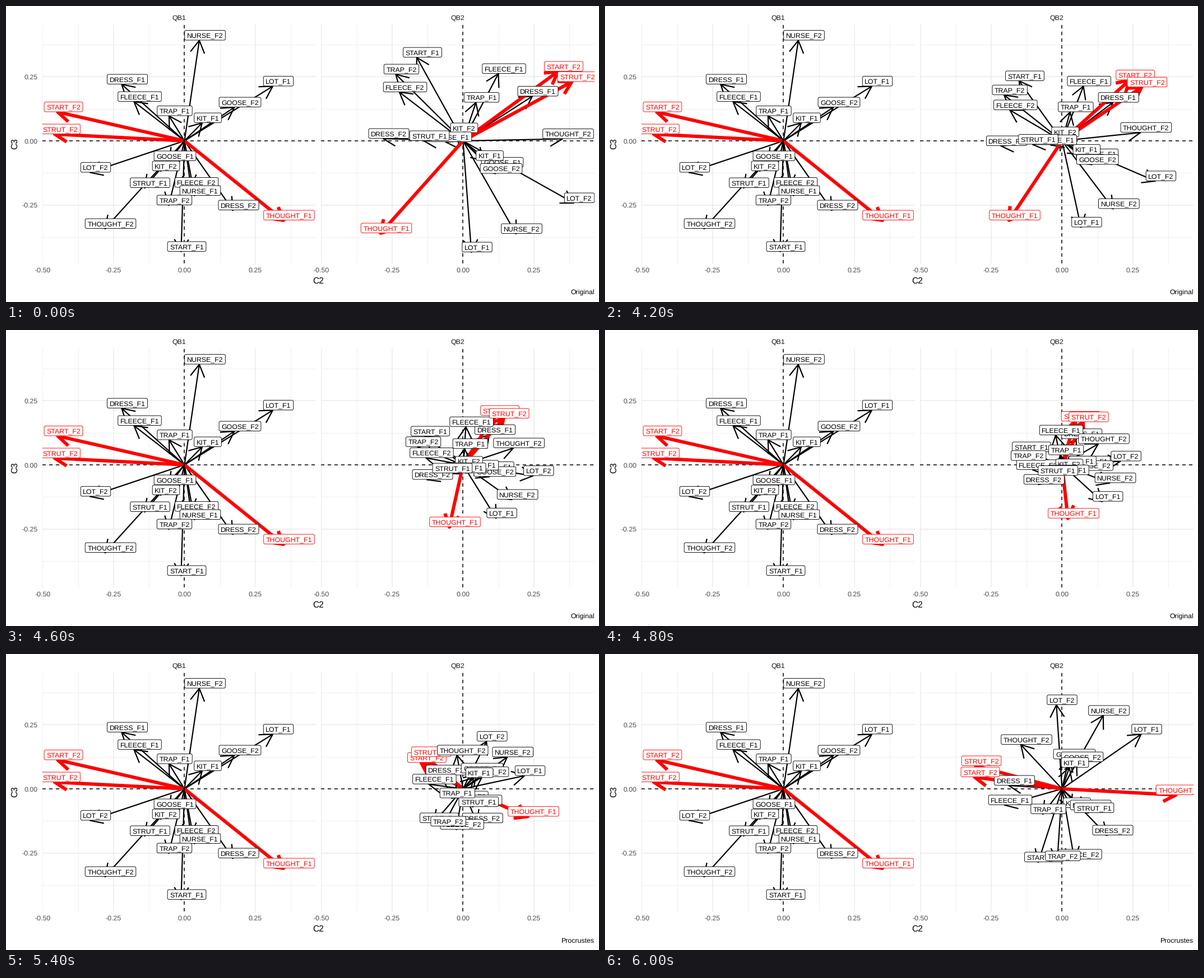
Write a matplotlib script that moves like this. It is 1058 by 529 pixels and loops after 10000 ms.

```python
import numpy as np
import matplotlib.pyplot as plt
from matplotlib.animation import FuncAnimation
from matplotlib.patches import FancyBboxPatch

W, H, DPI = 1058, 529, 100
PT = 72 / DPI                      # points per pixel
X_UNIT, Y_UNIT = 505.8, 458.0      # pixels per data unit
TOP, BOTTOM, Y0 = 33, 460, 241
NUDGE = np.array([10.1, 9.2])      # label offset from the arrow tip
BARB, BARB_ANGLE = 25.4, np.pi / 6
SMALL, LARGE = 12.4, 15.5
PAD, BOX_H = 4, 17.4
HOLD, MOVE, FRAMES = 40, 20, 100

plt.rcParams.update({"font.family": "Liberation Sans", "text.hinting": "none"})

# Arrow tips in pixels from the panel origin (y up):
# fixed QB1 tip, QB2 before rotation, QB2 after rotation
TIPS = {
    "DRESS_F1": ((-112, 101), (123.5, 79.5), (-95, 6)),
    "DRESS_F2": ((86.5, -124), (-142.5, 4), (80.5, -83)),
    "FLEECE_F1": ((-90, 70), (63, 120), (-102.5, -29)),
    "FLEECE_F2": ((11.5, -83.5), (-113.5, 87), (22, -126)),
    "GOOSE_F1": ((-27, -36), (60, -47.5), (12, 53)),
    "GOOSE_F2": ((89, 60), (58, -58.5), (26, 48)),
    "KIT_F1": ((31.5, 32), (37.5, -35.5), (13, 38)),
    "KIT_F2": ((-43, -54), (-8, 14), (16.5, -34)),
    "LOT_F1": ((157.5, 97.5), (15, -199), (141, 97.5)),
    "LOT_F2": ((-168.5, -56.5), (197.5, -111), (-10, 150)),
    "NURSE_F1": ((18, -98), (-31, -2), (41, -38)),
    "NURSE_F2": ((26.5, 179.5), (94.5, -166), (73.5, 131)),
    "START_F1": ((-6, -198), (-82.5, 149), (-42.5, -131)),
    "START_F2": ((-226, 51.5), (169.5, 124), (-156, 21)),
    "STRUT_F1": ((-71.5, -84), (-70, 0), (47, -43)),
    "STRUT_F2": ((-231.5, 12), (194, 105.5), (-154, 41)),
    "THOUGHT_F1": ((176.5, -142), (-147, -165), (203, -11)),
    "THOUGHT_F2": ((-142, -157), (177.5, 3.5), (-73.5, 79)),
    "TRAP_F1": ((-27.5, 44.5), (23, 68.5), (-34.5, -45)),
    "TRAP_F2": ((-28, -115), (-120, 119), (-8.5, -129)),
}
HIGHLIGHT = {"START_F2", "STRUT_F2", "THOUGHT_F1"}

fig = plt.figure(figsize=(W / DPI, H / DPI), dpi=DPI, facecolor="white")


def write(x, y, text, size=SMALL, color="black", ha="center", **kw):
    """Text whose capitals are centred on pixel row y."""
    return fig.text(x / W, 1 - (y + 0.36 * size) / H, text, fontsize=size * PT,
                    color=color, ha=ha, va="baseline", **kw)


def make_panel(title, left, right, x0):
    ax = fig.add_axes([left / W, 1 - BOTTOM / H, (right - left) / W, (BOTTOM - TOP) / H])
    ax.set(xlim=(left - x0, right - x0), ylim=(Y0 - BOTTOM, Y0 - TOP))
    ax.axis("off")
    for step in range(-4, 4):
        v = step * 0.125
        lw = (0.75 if step % 2 else 1.5) * PT
        ax.axvline(v * X_UNIT, color="#EBEBEB", lw=lw, zorder=1)
        if step > -4:
            ax.axhline(v * Y_UNIT, color="#EBEBEB", lw=lw, zorder=1)
    dash = dict(color="black", lw=1.5 * PT, ls=(0, (4, 4)), zorder=2)
    ax.axhline(0, **dash)
    ax.axvline(0, **dash)
    write((left + right) / 2, 20, title, color="#1A1A1A")
    for v in (-0.5, -0.25, 0, 0.25):
        if left <= x0 + v * X_UNIT:
            write(x0 + v * X_UNIT, 471, f"{v:.2f}", color="#4D4D4D")
    return ax


class Vector:
    """Arrow from the origin with a boxed label near its tip."""

    def __init__(self, ax, name, order):
        red = name in HIGHLIGHT
        color = "red" if red else "black"
        self.line, = ax.plot([], [], color=color, lw=(6 if red else 2.2) * PT,
                             solid_capstyle="butt", solid_joinstyle="round",
                             zorder=3 + order / 100)
        z = 4 + order / 10
        self.text = ax.text(0, 0, name, fontsize=SMALL * PT, color=color, ha="center",
                            va="baseline", clip_on=True, zorder=z + 0.05)
        self.width = self.text.get_window_extent().width + 2 * PAD
        self.box = FancyBboxPatch((0, 0), self.width, BOX_H,
                                  boxstyle="round,pad=0,rounding_size=2.6",
                                  fc="white", ec=color, lw=0.9 * PT, zorder=z)
        ax.add_patch(self.box)

    def place(self, tip):
        back = np.arctan2(-tip[1], -tip[0])
        (ax_, ay), (bx, by) = (
            tip + BARB * np.array([np.cos(back + a), np.sin(back + a)])
            for a in (BARB_ANGLE, -BARB_ANGLE))
        self.line.set_data([0, tip[0], np.nan, ax_, tip[0], bx],
                           [0, tip[1], np.nan, ay, tip[1], by])
        x, y = tip + NUDGE
        self.text.set_position((x, y - 0.36 * SMALL))
        self.box.set_x(x - self.width / 2)
        self.box.set_y(y - BOX_H / 2)


left_ax = make_panel("QB1", 64.6, 553, 318.4)
right_ax = make_panel("QB2", 561.6, 1050, 815.4)
for v in (-0.25, 0, 0.25):
    write(57, Y0 - v * Y_UNIT, f"{v:.2f}", color="#4D4D4D", ha="right")
write(557, 490, "C2", LARGE)
fig.text(16 / W, 1 - 246.5 / H, "C3", fontsize=LARGE * PT, rotation=90,
         ha="center", va="center")
caption = write(1050, 511, "Original", ha="right")

movers = []
for order, (name, tips) in enumerate(TIPS.items()):
    fixed, start, end = map(np.array, tips)
    Vector(left_ax, name, order).place(fixed)
    movers.append((Vector(right_ax, name, order), start, end))


def update(i):
    t = min(max((i - HOLD + 1) / MOVE, 0), 1)
    for vector, start, end in movers:
        vector.place(start + (end - start) * t)
    caption.set_text("Original" if i < HOLD + MOVE // 2 else "Procrustes")
    return []


anim = FuncAnimation(fig, update, frames=FRAMES, interval=100,
                     repeat=True, repeat_delay=0, blit=False)
plt.show()
```
